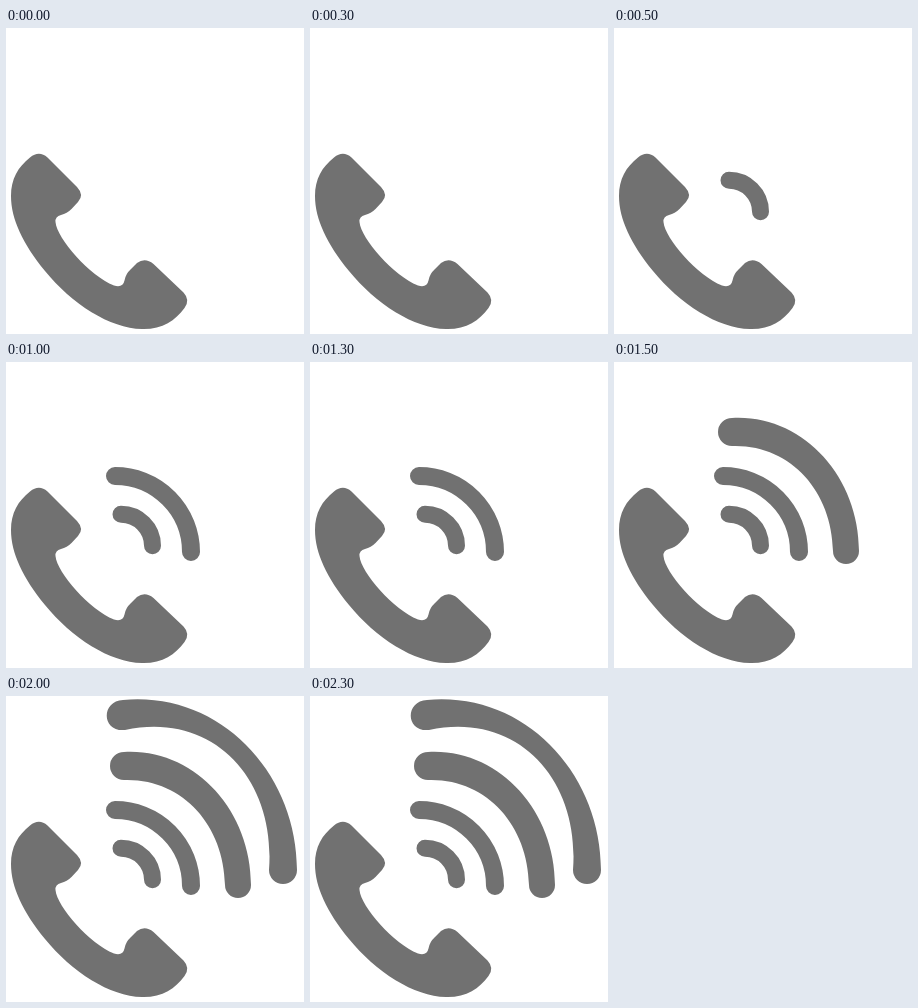
These frames come from a looping animation (298x306 px, 2500 ms). An HTML page:

```html
<!DOCTYPE html>
<html lang="en">
<head>
<meta charset="utf-8">
<title>Ringing phone</title>
<style>
  html, body { margin: 0; width: 100%; height: 100%; overflow: hidden; background: #fff; }
  svg { display: block; width: 298px; height: 306px; }
  .solid { fill: #717171; }
  .line { fill: none; stroke: #717171; stroke-linecap: round; }
  .wave { opacity: 0; }
</style>
</head>
<body>
<svg viewBox="0 0 298 306">
  <path class="solid" d="M24 129.5 Q33 122 41.5 129.5 L71 159 Q78.5 167 72 174
    L65.5 181 Q61 185.5 55 187 Q49 188.5 49.5 194 C51 211 84 248 108 257.5
    Q117 260 118.5 252.5 Q119.5 246 125 241 L131 235 Q139 229 147.5 236
    L177.5 264.5 Q184.5 272 178.5 280 C169 293 156 301.5 136 301
    C104 300.5 66 276 39 243 C17 216 5 191 5 168 C5 151 12 139 24 129.5 Z"/>
  <path class="wave line" stroke-width="17" d="M115 152.3 A31.5 31.5 0 0 1 146.5 183.8"/>
  <path class="wave line" stroke-width="18" d="M109 114 A76 76 0 0 1 185 190"/>
  <path class="wave solid" d="M118 56 C188 52 245 114 245 189 A13 13 0 0 1 219 189
    C218 129 176 82 118 84 A14 14 0 0 1 118 56 Z"/>
  <path class="wave solid" d="M117 4 C215 -5 291 78 291 174 A14 14 0 0 1 263 174
    C270 84 208 15 119 34 C95 36 95 5 117 4 Z"/>
</svg>
<script>
  const LOOP = 2500, STEP = 500;

  document.querySelectorAll('.wave').forEach((wave, i) => {
    const start = (i + 1) * STEP / LOOP;
    wave.animate([
      { opacity: 0, offset: 0, easing: 'step-end' },
      { opacity: 1, offset: start, easing: 'step-end' },
      { opacity: 1, offset: 1 }
    ], { duration: LOOP, iterations: Infinity });
  });
</script>
</body>
</html>
```
